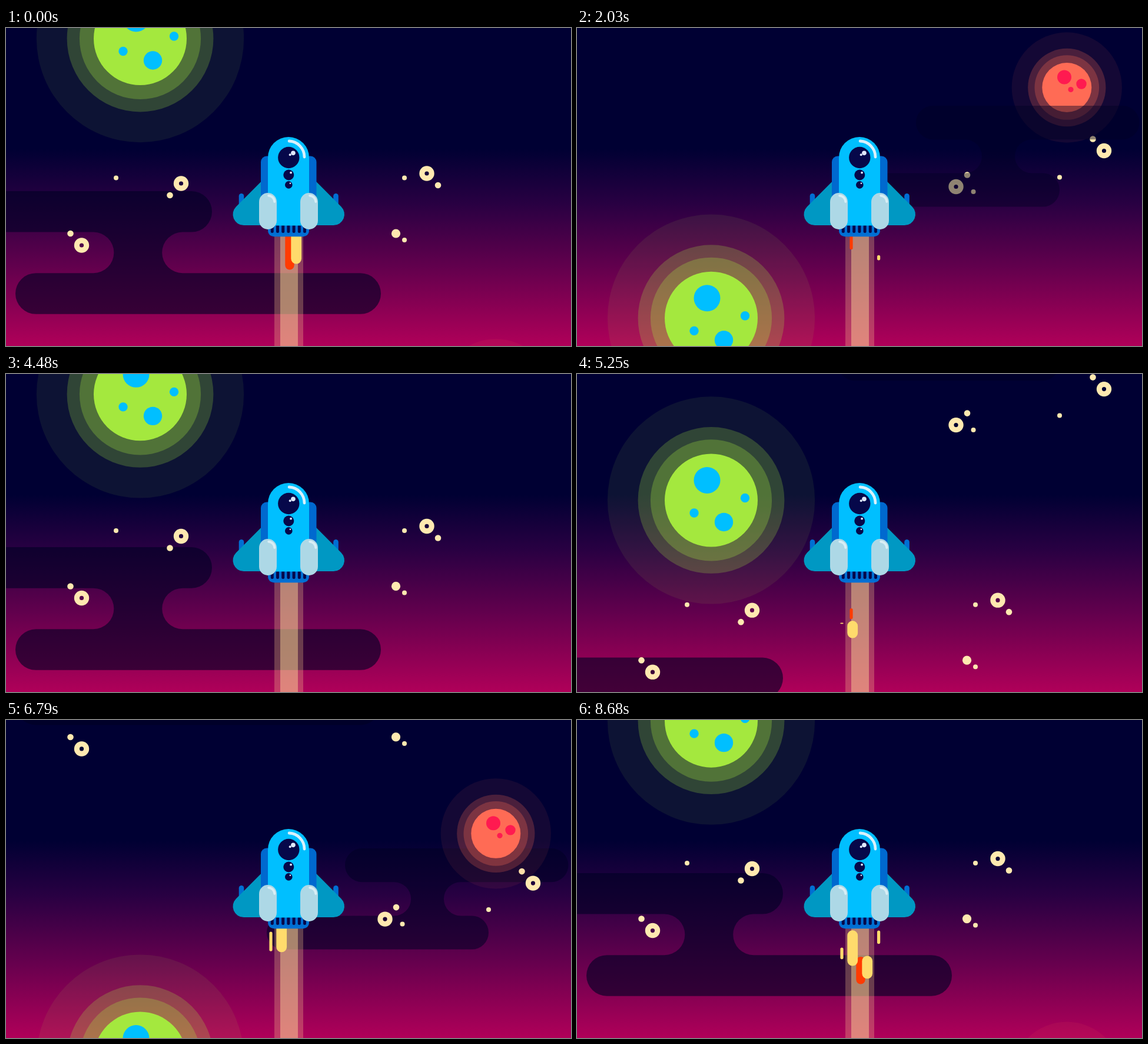
Recreate the animation shown at these times as an HTML page with a canvas. Size 960x540 px, loop 8750 ms.

```html
<!DOCTYPE html>
<html lang="en">
<head>
<meta charset="utf-8">
<title>Rocket flight</title>
<style>
html, body { margin: 0; width: 100%; height: 100%; overflow: hidden; background: #000033; }
canvas { display: block; width: 100%; height: 100%; }
</style>
</head>
<body>
<canvas id="stage" width="960" height="540"></canvas>
<script>
const g = document.getElementById('stage').getContext('2d');
const STEP = 70, STEPS = 125;
const TAU = Math.PI * 2;
const STAR = '#ffe9b0', NAVY = '#06084a', BLUE = '#006fd3', SKY = '#00bfff', GLINT = '#e0e8fa';
const YELLOW = '#ffdb6c', RED = '#ff3b00', PINK = '#ff1a50';

function dot(x, y, r, fill, alpha = 1) {
  g.globalAlpha = alpha;
  g.fillStyle = fill;
  g.beginPath();
  g.arc(x, y, r, 0, TAU);
  g.fill();
  g.globalAlpha = 1;
}

function bar(x, y, w, h, r, fill) {
  g.fillStyle = fill;
  g.beginPath();
  g.roundRect(x, y, w, h, r);
  g.fill();
}

function arc(x, y, r, from, to, width, color) {
  g.strokeStyle = color;
  g.lineWidth = width;
  g.lineCap = 'round';
  g.beginPath();
  g.arc(x, y, r, from, to);
  g.stroke();
}

// Each layer falls at its own speed and returns at every step in passes.
function drift(n, passes, y0, speed, draw) {
  for (const pass of passes) {
    const y = y0 + speed * (n - pass);
    if (y > -300 && y < 800) draw(y);
  }
}

// A disc with three halos in fixed proportion to its radius.
function planet(x, y, r, color) {
  dot(x, y, r * 2.23, color, .08);
  dot(x, y, r * 1.575, color, .23);
  dot(x, y, r * 1.305, color, .28);
  dot(x, y, r, color);
}

function greenPlanet(y) {
  planet(228, y, 79, '#a4e83e');
  dot(221, y - 34, 22.5, SKY);
  dot(249.5, y + 37, 15.7, SKY);
  dot(285.5, y - 4, 7.7, SKY);
  dot(199, y + 21.5, 7.7, SKY);
}

function redPlanet(y) {
  planet(832.3, y, 42, '#ff6b55');
  dot(828, y - 17.5, 12, PINK);
  dot(857, y - 6, 8.7, PINK);
  dot(839, y + 3.5, 4.6, PINK);
}

const star = (x, y, r = 4) => dot(x, y, r, STAR);

// A ring star with a small companion on one of its diagonals.
function pair(x, y, sx, sy) {
  arc(x, y, 8.15, 0, TAU, 9.1, STAR);
  star(x + sx * 19, y + sy * 20, 5.3);
}

function leftStars(y) {
  pair(297.5, y, -1, 1);
  pair(128.5, y + 105, -1, -1);
  pair(715, y - 17, 1, 1);
  star(187, y - 9.5);
  star(677, y - 9.5);
  star(662.5, y + 85, 7.6);
  star(677, y + 96);
}

function rightStars(y) {
  pair(895.5, y, -1, -1);
  pair(644, y + 61, 1, -1);
  star(673.5, y + 69.5);
  star(820, y + 45);
}

// Two pill bands, each 2r high, joined by a neck with concave sides.
function cloud(y, r, top, low, neck, alpha) {
  const p = new Path2D();
  p.roundRect(top[0], y, top[1] - top[0], 2 * r, r);
  p.roundRect(low[0], y + 4 * r, low[1] - low[0], 2 * r, r);
  const [a, b] = neck;
  p.moveTo(a, y + 2 * r);
  p.lineTo(b, y + 2 * r);
  p.arc(b, y + 3 * r, r, -Math.PI / 2, Math.PI / 2, true);
  p.lineTo(a, y + 4 * r);
  p.arc(a, y + 3 * r, r, Math.PI / 2, -Math.PI / 2, true);
  g.globalAlpha = alpha;
  g.fillStyle = '#000024';
  g.fill(p);
  g.globalAlpha = 1;
}
const leftCloud = y => cloud(y, 34.8, [-40, 350], [16, 637], [148.5, 300], .62);
const rightCloud = (y, alpha) => cloud(y, 28.6, [576, 955.5], [443, 820], [659.5, 772.5], alpha);

const LIFE = 8, NOZZLE = 354;

// Launches start at first and their spacing widens by a fixed amount each time.
// The tail leaves the nozzle halfway through the life and catches up with the tip.
function jet(n, x, w, run, color, first, gap, widen = 0) {
  for (let k = 0; k < 6; k++) {
    const e = (n - first - k * (gap + widen * k)) / LIFE;
    if (e <= 0 || e >= 1) continue;
    const top = Math.max(NOZZLE - 18, NOZZLE + run * (2 * e - 1));
    bar(x - w / 2, top, w, NOZZLE + run * e - top, w / 2, color);
  }
}

function flames(n) {
  jet(n, 482, 15.4, 141, RED, -3.2, 14.7, 3.94);
  jet(n, 466, 5.2, 80, RED, 26.8, 42);
  jet(n, 493.2, 17.8, 124, YELLOW, -3, 12.55, 2.35);
  jet(n, 468.2, 17.8, 124, YELLOW, 17.9, 25.5);
  jet(n, 512.6, 5.2, 49, YELLOW, 22.4, 14.8, 5.88);
  jet(n, 450, 5.2, 72, YELLOW, 16.2, 25.5);
}

function exhaust() {
  g.fillStyle = 'rgba(255,214,140,.28)';
  g.fillRect(456, 350, 49, 190);
  g.fillStyle = 'rgba(255,220,150,.45)';
  g.fillRect(466, 350, 30, 190);
}

function side() {
  bar(395.7, 281, 8.6, 30, 4.3, BLUE);
  g.fillStyle = '#0098c3';
  g.fill(new Path2D('M434 260.3L390.9 303.4A18.5 18.5 0 0 0 404 335H446V260Z'));
  bar(433, 217.5, 22, 80, 10, '#0069cf');
}

function pod(x) {
  bar(x, 280, 30, 62, 15, '#add8e6');
  arc(x + 15.5, 295.5, 10.8, -1.5, -.05, 4, '#d9eef5');
}

function porthole(y, r) {
  dot(480.3, y, r, NAVY);
  dot(480.3 + r * .42, y - r * .42, r * .21, GLINT);
}

function rocket() {
  side();
  g.save();
  g.translate(960.5, 0);
  g.scale(-1, 1);
  side();
  g.restore();
  bar(445, 320, 70, 34.2, 10, BLUE);
  for (let i = 0; i < 7; i++) bar(449.8 + i * 9.2, 330, 5, 18, 2.5, NAVY);
  bar(445, 185, 70, 150.5, [35, 35, 0, 0], SKY);
  arc(480, 219, 27, -1.53, 0, 4.8, '#d9f1fb');
  porthole(220, 18.2);
  dot(482.7, 215.3, 2, GLINT);
  porthole(249.5, 9);
  porthole(266.4, 6.3);
  pod(430);
  pod(500);
}

const sky = g.createLinearGradient(0, 0, 0, 540);
[[.38, '#000033'], [.55, '#280042'], [.75, '#62004d'], [1, '#b00059']]
  .forEach(([at, color]) => sky.addColorStop(at, color));

const LEFT = [0, 63, 125], RIGHT = [-34, 29, 91];

// The right cloud passes once in front of the planets and once behind them.
function draw(n) {
  g.fillStyle = sky;
  g.fillRect(0, 0, 960, 540);
  drift(n, LEFT, 277, 17.05, leftCloud);
  drift(n, [92], 132, 17.2, y => rightCloud(y, .56));
  drift(n, LEFT, 18, 16.37, greenPlanet);
  drift(n, LEFT, 264, 11.43, leftStars);
  drift(n, RIGHT, 208.5, 11.43, rightStars);
  drift(n, RIGHT, 101, 15.31, redPlanet);
  drift(n, [29], 132, 17.2, y => rightCloud(y, .44));
  exhaust();
  flames(n);
  rocket();
}

const begin = performance.now();
function tick() {
  const t = performance.now() - begin;
  draw(Math.floor(t / STEP) % STEPS);
  requestAnimationFrame(tick);
}
tick();
</script>
</body>
</html>
```
